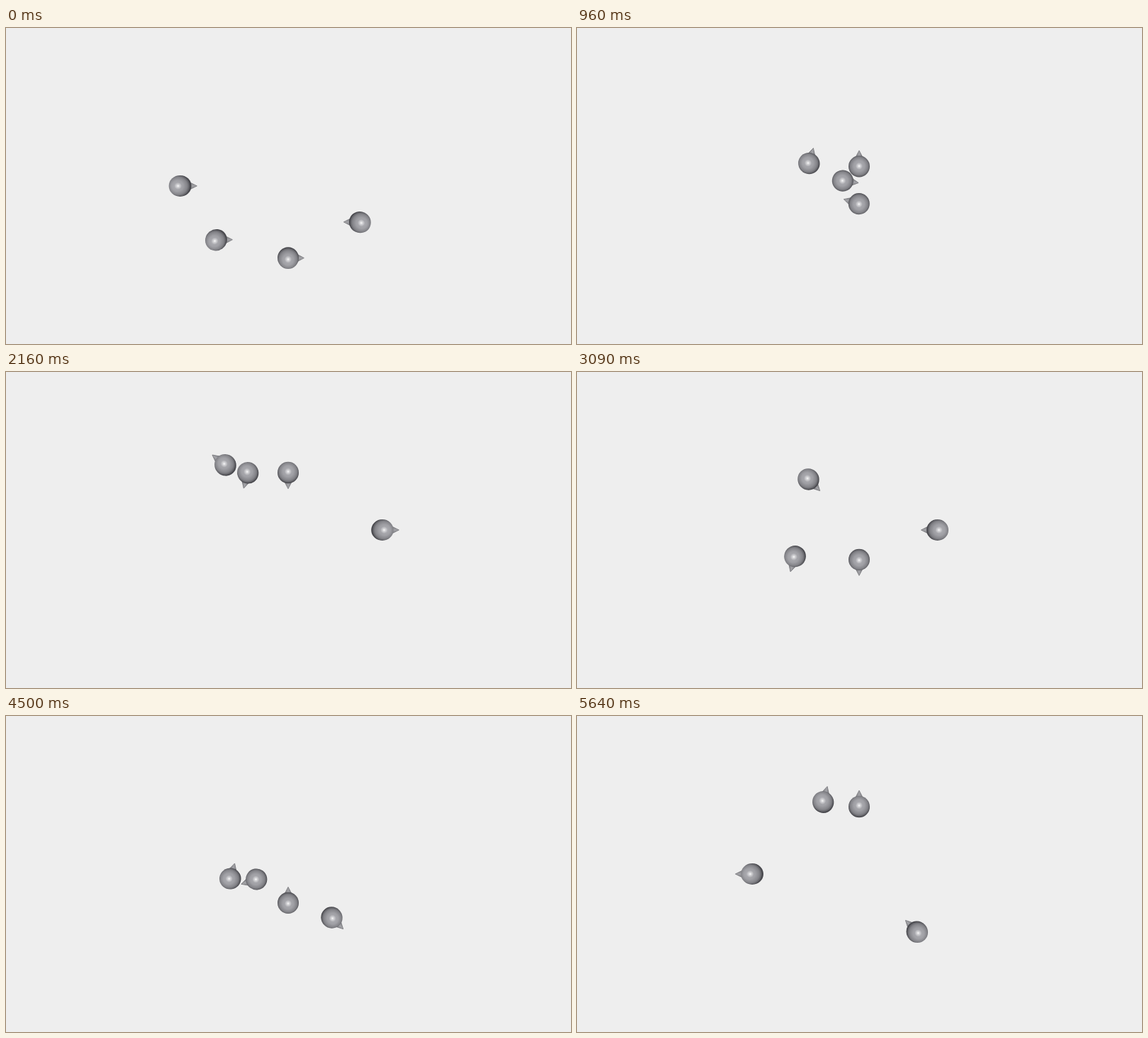
These frames come from a looping animation (797 by 446 pixels, 6140 ms). An HTML page with a canvas:

```html
<!DOCTYPE html>
<html lang="en">
<head>
<meta charset="utf-8">
<style>
  html, body { margin: 0; width: 100%; height: 100%; overflow: hidden; background: #eee; }
  canvas { display: block; }
</style>
</head>
<body>
<canvas id="stage" width="797" height="446"></canvas>
<script>
const ctx = document.getElementById("stage").getContext("2d");
const LOOP = 6140, STEP = 30, LAST = 5640;
const CX = 398, CY = 223, UNIT = 25.4, RADIUS = 15, FOCAL = 430;
// Units per ms, then times in ms: speeding up, slowing down, leaving early, turning round.
const SPEED = .0053, RISE = 550, FALL = 680, OVERLAP = 100, TURN = 280;

const smooth = (t, from, to) => {
  const u = Math.min(1, Math.max(0, (t - from) / (to - from)));
  return u * u * (3 - 2 * u);
};

// Each agent walks between grid points. A leg may give way to others:
// slow: [from, to, ms lost]; sway: [distance, width, sideways px] bumps.
const agents = [
  plan(0, [0, -4], [{ to: [0, 4] }, { to: [0, -4] }, { to: [0, 4] }]),
  plan(0, [-4, -3], [
    { to: [-2, 4], slow: [0, 900, 125] },
    { to: [-4, -3], slow: [3000, 3700, 60] },
    { to: [-2, 4] }]),
  plan(0, [-6, 0], [
    { to: [6, 0], sway: [[4.2, 2, -9]] },
    { to: [-6, 0], slow: [3200, 5300, 380], sway: [[5.5, 1, 12], [8.3, 1, -10]] }]),
  plan(Math.PI, [4, -2], [
    { to: [-4, 4], slow: [350, 1300, 340], sway: [[4.3, 2, -43]] },
    { to: [4, -4], slow: [2500, 3400, 45], sway: [[6, 1.2, 10]] },
    { to: [-4, 4] }])
];

// Chains the legs: each starts just before the previous one has fully stopped.
function plan(facing, from, route) {
  let start = 0;
  return route.map(({ to, slow = [0, 1, 0], sway = [] }, i) => {
    const dx = to[0] - from[0], dy = from[1] - to[1];
    const leg = { from, slow, sway, start, facing, rise: i ? RISE : 0,
      length: Math.hypot(dx, dy), angle: Math.atan2(dy, dx) };
    leg.end = start + leg.length / SPEED + (leg.rise + FALL) / 2 + slow[2];
    start = leg.end - OVERLAP;
    from = to;
    facing = leg.angle;
    return leg;
  });
}

function travelled(leg, t) {
  const [from, to, lost] = leg.slow;
  const left = leg.end - lost - leg.start, s = t - leg.start - lost * smooth(t, from, to);
  if (s < leg.rise) return SPEED * s * s / 2 / leg.rise;
  if (s > left - FALL) return leg.length - SPEED * Math.max(0, left - s) ** 2 / 2 / FALL;
  return SPEED * (s - leg.rise / 2);
}

function pointOn(leg, d) {
  const side = leg.sway.reduce((sum, [at, width, px]) =>
    sum + px * Math.exp(-(((d - at) / width) ** 2)), 0);
  const c = Math.cos(leg.angle), s = Math.sin(leg.angle);
  return [CX + (leg.from[0] + d * c) * UNIT - side * s,
          CY + (d * s - leg.from[1]) * UNIT + side * c];
}

function pose(legs, t) {
  const leg = legs.findLast(l => l.start <= t), d = travelled(leg, t);
  const [x, y] = pointOn(leg, d), [nextX, nextY] = pointOn(leg, d + .05);
  const wanted = Math.atan2(nextY - y, nextX - x);
  // Shorter way round; reversals go clockwise.
  const full = 2 * Math.PI, bias = full * .45;
  const turn = ((wanted - leg.facing + bias) % full + full) % full - bias;
  const begin = leg.start + (leg.rise ? 60 : 0);
  return [x, y, leg.facing + turn * smooth(t, begin, begin + TURN)];
}

function fade(gradient, stops) {
  stops.forEach(([at, colour]) => gradient.addColorStop(at, colour));
  return gradient;
}

function disc(x, r, fill) {
  ctx.fillStyle = fill;
  ctx.beginPath();
  ctx.arc(x, 0, r, 0, 2 * Math.PI);
  ctx.fill();
}

function drawCone() {
  ctx.fillStyle = fade(ctx.createLinearGradient(0, -6, 0, 6),
    [[0, "#727277"], [.5, "#a4a4a8"], [1, "#727277"]]);
  ctx.strokeStyle = "#77777b";
  ctx.lineWidth = .8;
  ctx.beginPath();
  ctx.moveTo(11, -6);
  ctx.lineTo(22.4, 0);
  ctx.lineTo(11, 6);
  ctx.fill();
  ctx.stroke();
}

function drawAgent([x, y, heading]) {
  const dx = x - CX, dy = y - CY, dist = Math.hypot(dx, dy);
  const side = Math.atan2(dy, dx), shift = dist * .035;
  ctx.save();
  ctx.translate(x, y);
  // Perspective stretches everything away from the centre of view.
  ctx.rotate(side);
  ctx.scale(Math.hypot(1, dist / FOCAL), 1);
  ctx.save();
  ctx.rotate(heading - side);
  drawCone();
  ctx.restore();
  disc(0, RADIUS, fade(ctx.createRadialGradient(shift, 0, 0, shift * .4, 0, RADIUS + .4),
    [[0, "#b0b0b5"], [.5, "#a0a0a5"], [.8, "#838388"], [.94, "#626267"], [1, "#48484d"]]));
  disc(shift / 2, 5, fade(ctx.createRadialGradient(shift / 2, 0, 0, shift / 2, 0, 5),
    [[0, "rgba(255,255,255,.95)"], [.35, "rgba(255,255,255,.5)"], [1, "rgba(255,255,255,0)"]]));
  ctx.restore();
}

function render(now) {
  const t = Math.min(LAST, Math.floor(now % LOOP / STEP) * STEP);
  ctx.fillStyle = "#eee";
  ctx.fillRect(0, 0, 797, 446);
  agents.forEach(legs => drawAgent(pose(legs, t)));
}

let start;
function loop(now) {
  start ??= now;
  render(now - start);
  requestAnimationFrame(loop);
}
render(0);
requestAnimationFrame(loop);
</script>
</body>
</html>
```
